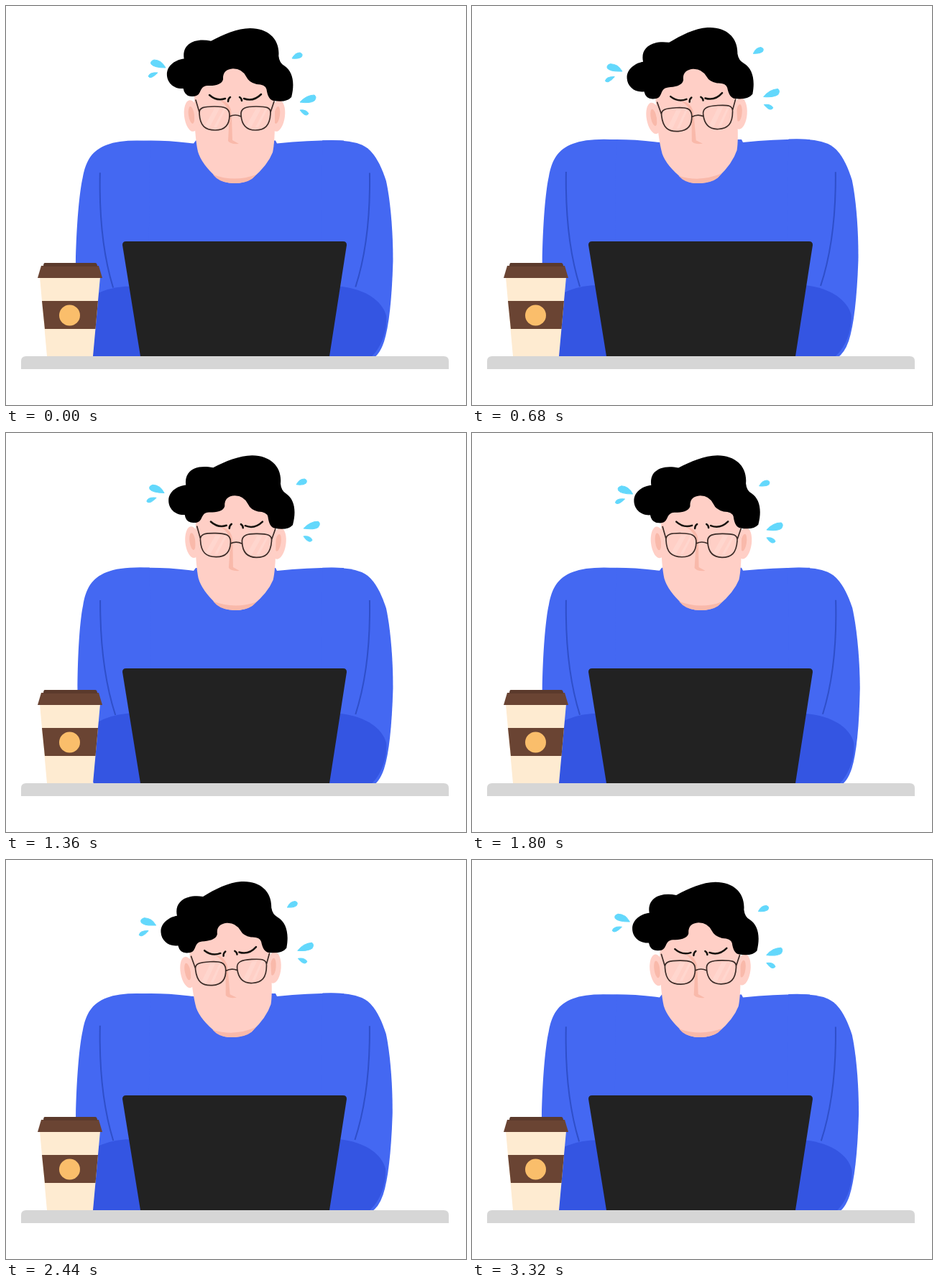
Animation, 640 px wide and 556 px high, one loop 3360 ms. Source, as an HTML page:

```html
<!DOCTYPE html>
<html lang="en">
<head>
<meta charset="utf-8">
<style>
  html, body { margin: 0; width: 100%; height: 100%; overflow: hidden; background: #fff; }
  svg { display: block; width: 100vw; height: 100vh; }
  .sweater { fill: #4468f2; }
  .forearm { fill: #3455e2; }
  .crease { fill: none; stroke: #2f4fc9; stroke-width: 2; }
  .skin { fill: #ffcfc6; }
  .shade { fill: #f9b9aa; }
  .brow, .glasses { fill: none; stroke-linecap: round; stroke: #17130f; stroke-width: 2.5; }
  .glasses { stroke: #3b2c28; stroke-width: 1.7; }
  .drop { fill: #63d8fc; stroke: #63d8fc; stroke-linejoin: round; }
  .brown { fill: #6a4433; }
</style>
</head>
<body>
<svg viewBox="0 0 640 556">
  <g id="body">
    <path class="sweater" d="M165 189Q205 184 261 191L264 187H375L377 191Q430 186 470 187V492H165Z"/>
    <g id="armL">
      <path class="sweater" d="M200 187Q160 185 140 193C119 201 111 216 107 239C102 262 99 310 98.500 357Q98 440 122 492H200Z"/>
      <path class="forearm" d="M126 492Q120 488 119 482L124 403Q143 392 168 390H190L200 492Z"/>
      <path class="crease" d="M131 232Q130 326 151 392"/>
    </g>
    <g id="armR">
      <path class="sweater" d="M440 187Q476 185 495 193C511 200 521 219 529 243C535 270 539 313 539 355Q537 435 527 467Q520 488 508 492H440Z"/>
      <path class="forearm" d="M463 390C499 393 524 409 530 431C532 454 521 480 505 492H445Z"/>
      <path class="crease" d="M506 232Q508 325 487 391"/>
    </g>
  </g>

  <g id="head">
    <ellipse class="skin" cx="258" cy="153" rx="10" ry="22" transform="rotate(-7 258 153)"/>
    <ellipse class="skin" cx="378" cy="153" rx="10" ry="22" transform="rotate(7 378 153)"/>
    <ellipse class="shade" cx="258" cy="152" rx="4" ry="12" transform="rotate(-8 258 152)"/>
    <ellipse class="shade" cx="377" cy="152" rx="4" ry="12" transform="rotate(8 377 152)"/>
    <path class="skin" d="M262 110L295 82H340L374 110V160Q374 190 371 204Q364 222 343 240Q333 247 318 247Q302 247 293 239Q272 220 267 203Q263 185 262 150Z"/>
    <path class="shade" d="M288 235Q318 246 348 235L342 241Q333 247 318 247Q302 247 293 240Z"/>
    <path class="shade" d="M298 132Q309 132 313 145L314 155L315 187L324 192Q312 193 309 188L311 150Q307 137 298 132Z"/>
    <path transform="translate(3.100 1.200) scale(.99)" d="M258 126Q248 126 246 115C232 116 223 106 223 95C223 82 236 74 247 73C244 55 258 43 285 48C302 39 322 30 340 30C366 30 382 46 380 69Q381 79 388 83C400 91 403 107 398 127Q391 135 373 132Q365 131 363 116Q361 109 349 109Q338 106 335 99Q329 87 316 87Q301 88 302 102C300 110 289 111 280 111C266 112 274 127 258 126Z"/>
    <g fill="#fff" opacity=".15">
      <path d="M276 168L290 143H297L283 169ZM289 169L303 143H306L293 169Z"/>
      <path d="M334 168L348 143H355L341 169ZM347 169L361 143H364L351 169Z"/>
    </g>
    <path class="brow" d="M283 124Q293 133 305 129M312 127Q309 129 309 133M325 127Q328 129 328 132M331 129Q344 134 355 123"/>
    <path class="glasses" d="M269 150C268 141 276 140 290 140C304 140 311 142 311 152C311 167 303 173 291 173C277 173 270 167 269 150ZM327 152C326 142 334 140 348 140C362 140 369 141 368 150C367 167 360 173 347 173C335 173 328 167 327 152ZM311 154Q319 150 327 154M269 148L264 131M368 148L373 133"/>
    <g id="dropsL" class="drop">
      <path d="M222 86Q216 75 206 75Q200 77 202 81Q206 86 222 86Z"/>
      <path d="M211 93Q200 92 198 98Q201 103 211 93Z"/>
    </g>
    <g id="dropsR" class="drop">
      <path d="M398 73Q402 65 409 65Q414 67 411 71Q407 74 398 73Z"/>
      <path d="M409 134Q418 124 429 124Q433 127 429 132Q423 136 409 134Z"/>
      <path d="M409 145Q418 144 421 150Q417 156 409 145Z"/>
    </g>
  </g>

  <path d="M187 488L162 333Q162 328 167 328H469Q474 328 474 333L450 488Z" fill="#222"/>

  <path d="M47 378H131L121 488H57Z" fill="#feebd1"/>
  <path class="brown" d="M50 411H128L124.500 450H54Z"/>
  <path class="brown" d="M49 362H129L134 379H44Z"/>
  <path d="M54 358H124Q127 358 127 363H52Q52 358 54 358Z" fill="#5b3a2c"/>
  <circle cx="88.500" cy="431" r="14.500" fill="#fabe6b"/>

  <path d="M21 506V495Q21 488 28 488H609Q616 488 616 495V506Z" fill="#d6d6d6"/>
</svg>
<script>
const STEP = 40, STEPS = 84, TAU = Math.PI * 2;
// Sideways lean of the head: [step, pixels at hair height]
const lean = [[0, 3], [9, -3.5], [16, -5.5], [24, -2.5], [34, 5.3], [39, 6],
              [45, 4.5], [61, -5.5], [72, 1.5], [83, 2.2]];

const set = (id, transform) => document.getElementById(id).setAttribute('transform', transform);
const move = (id, x, y) => set(id, `translate(${x} ${y})`);
const turn = (id, radians, x, y) => set(id, `rotate(${radians * 360 / TAU} ${x} ${y})`);

function keyAt(i) {
  const n = lean.length, lap = Math.floor(i / n);
  const [k, v] = lean[i - lap * n];
  return [k + lap * STEPS, v];
}

function slopeAt(i) {
  const [k0, v0] = keyAt(i - 1), [k1, v1] = keyAt(i + 1);
  return (v1 - v0) / (k1 - k0);
}

// Smooth cubic through the keys, closed over the loop
function leanAt(k) {
  let i = lean.length - 1;
  while (lean[i][0] > k) i--;
  const [k0, a] = keyAt(i), [k1, b] = keyAt(i + 1);
  const w = k1 - k0, u = (k - k0) / w, r = 1 - u;
  return a * r * r * (1 + 2 * u) + b * u * u * (3 - 2 * u)
    + w * u * r * (r * slopeAt(i) - u * slopeAt(i + 1));
}

function draw(now) {
  const k = Math.floor(now / STEP) % STEPS;
  const tilt = leanAt(k);
  turn('head', (tilt - 3) / 150, 318, 246);
  move('body', 0, tilt * 0.18);

  const a = TAU * k * 13 / STEPS;
  const drift = 3.4 - 2.4 * Math.cos(a) - Math.cos(2 * a) + 0.4 * Math.sin(a);
  move('dropsL', -drift * 0.9, -drift * 0.2);
  move('dropsR', drift * 0.7, -drift * 0.5);

  const sway = peak => 1.6 * Math.cos(TAU * (k - peak) / 21);
  turn('armL', -sway(10) / 145, 150, 215);
  turn('armR', -sway(6.5) / 145, 490, 215);
}

const start = performance.now();
function tick() {
  draw(performance.now() - start);
  requestAnimationFrame(tick);
}
tick();
</script>
</body>
</html>
```
